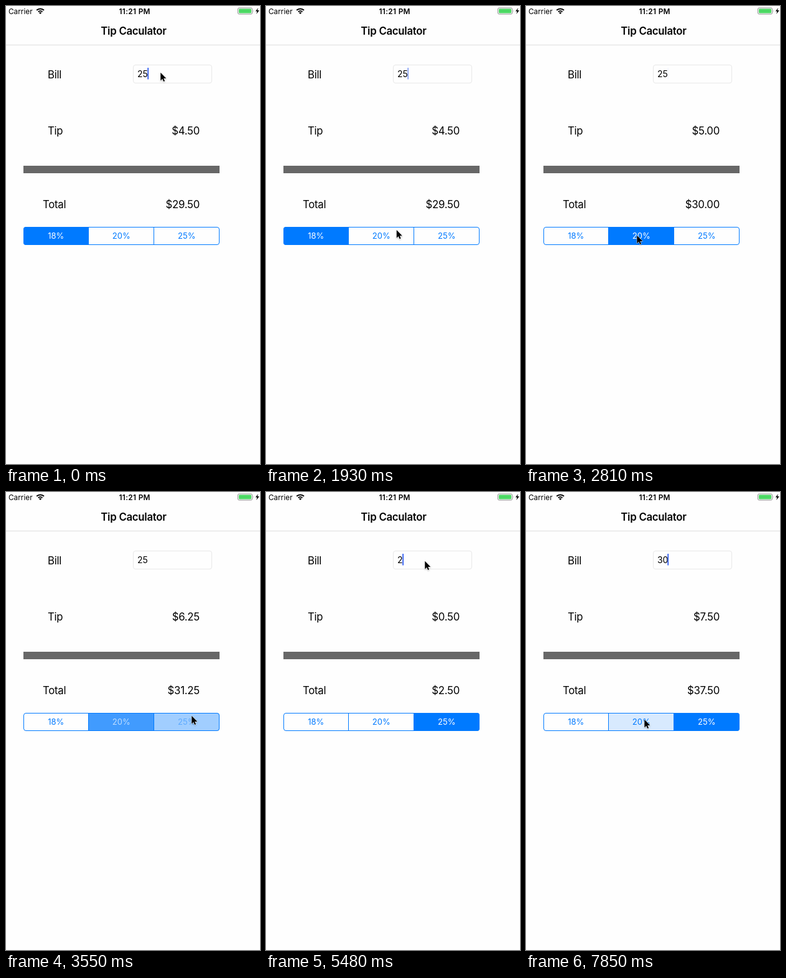
An HTML page for the animation above (8 s loop, 408x734 px).

```html
<!DOCTYPE html>
<html lang="en">
<head>
<meta charset="utf-8">
<title>Tip calculator</title>
<style>
html, body { margin: 0; width: 100%; height: 100%; overflow: hidden; background: #fefefe; }
svg { display: block; width: 100%; height: 100%; }
text { font: 16.76px Inter, Roboto, sans-serif; letter-spacing: -.25px; white-space: pre; }
.bold { font-weight: 600; }
.status { font-size: 11.8px; letter-spacing: 0; }
.time { letter-spacing: .35px; }
.field { font-size: 14px; letter-spacing: -.15px; }
.seg { font-size: 13px; letter-spacing: 0; }
.mid { text-anchor: middle; }
.end { text-anchor: end; }
</style>
</head>
<body>
<svg viewBox="0 0 408 734">
  <defs>
    <clipPath id="round"><rect x="28" y="354" width="315" height="29" rx="4"/></clipPath>
    <filter id="soft" x="-50%" y="-50%" width="200%" height="200%">
      <feDropShadow dx="0" dy="1" stdDeviation="1" flood-opacity=".3"/>
    </filter>
  </defs>

  <text class="status" x="4" y="12.5">Carrier</text>
  <path d="M49.2 6.8a8.4 8.4 0 0 1 11.8 0M51.7 9.4a4.9 4.9 0 0 1 6.8 0" fill="none" stroke="#000" stroke-width="2"/>
  <path d="M55.1 13l-2.1-2.1a3 3 0 0 1 4.2 0z"/>
  <text class="status bold time mid" x="206.7" y="12.5">11:21 PM</text>
  <rect x="372.5" y="3" width="23" height="10" rx="2" fill="none" stroke="#8e8e8e"/>
  <rect x="374" y="4.5" width="20" height="7" rx="1" fill="#4cd964"/>
  <path d="M397 6.3q1.4 1.7 0 3.4z" fill="#8e8e8e"/>
  <path d="M405 3l-4.2 5.6h2.6l-1.2 4.4 4.6-6h-2.9z"/>

  <text class="bold mid" x="205" y="46">Tip Caculator</text>
  <path d="M0 62.5h408" stroke="#dedede"/>

  <text x="67" y="115.5">Bill</text>
  <text x="67" y="206">Tip</text>
  <text x="59" y="324">Total</text>
  <rect x="204.5" y="94.5" width="126" height="29" rx="3.5" fill="none" stroke="#e8e8e8"/>
  <text id="bill" class="field" x="211" y="113.5"></text>
  <rect id="caret" y="99" width="2" height="18.5" fill="#426bf2"/>
  <text id="tip" class="end" x="311" y="206"></text>
  <rect x="28" y="256" width="315" height="12" fill="#676767"/>
  <text id="total" class="end" x="311" y="324"></text>

  <g id="segs" clip-path="url(#round)"></g>
  <g fill="none" stroke="#007aff">
    <rect x="28.5" y="354.5" width="314" height="28" rx="3.5"/>
    <path d="M132.5 354v29M237.5 354v29"/>
  </g>

  <path id="cursor" d="M.3 .8v12.6l2.9-2.7 1.9 4.4 2-.8-1.9-4.3h4.1z"
        stroke="#fff" paint-order="stroke" filter="url(#soft)"/>
</svg>
<script>
const $ = id => document.getElementById(id);
const LOOP = 8000, TICK = 147.8;   // the screen refreshes once per tick

// All times below are in ticks.
const moves = [
  { from: 9, to: 11, x: 304, y: 332 },
  { from: 12, to: 14, x: 178, y: 367 },
  { from: 19, to: 22, x: 298, y: 358 },
  { from: 26, to: 31, x: 249, y: 102 },
  { from: 32, to: 34, x: 255, y: 110 },
  { from: 47, to: 48, x: 260, y: 169 },
  { from: 48, to: 51, x: 190, y: 364 }
];
const edits = [
  { at: 0, text: '25' }, { at: 37, text: '2' }, { at: 39, text: '' },
  { at: 41, text: '3' }, { at: 45, text: '30' }
];
const taps = [{ at: 16, seg: 1 }, { at: 23, seg: 2 }, { at: 53, seg: 1 }];
const rates = [.18, .2, .25];
const FADE = 3, PRESSED = .15;

const clamp = v => Math.min(1, Math.max(0, v));
const smooth = v => (v = clamp(v), v * v * (3 - 2 * v));
const easeOut = v => 1 - (1 - clamp(v)) ** 2;
const money = n => '$' + n.toFixed(2);

const left = i => 28 + 105 * i;
$('segs').innerHTML = rates.map((r, i) =>
  `<rect x="${left(i)}" y="354" width="105" height="29" fill="#007aff"/>
   <text class="seg mid" x="${left(i) + 52.3}" y="373">${r * 100}%</text>`).join('');
const fills = [...$('segs').querySelectorAll('rect')];
const names = [...$('segs').querySelectorAll('text')];

function cursorAt(n) {
  let x = 248, y = 106;
  for (const m of moves) {
    const k = easeOut((n - m.from) / (m.to - m.from));
    x += (m.x - x) * k;
    y += (m.y - y) * k;
  }
  return [x, y];
}

// Solid for a moment after each edit, then blinking with short fades.
function caretAt(since) {
  const hold = 440, period = 990;
  if (since < hold) return 1;
  const p = (since - hold) % period;
  return clamp((Math.abs(p - 240) - 140) / 200);
}

// A tap tints its segment, then cross-fades the selection to it.
function segments(n) {
  const fill = [1, 0, 0];
  let selected = 0;
  for (const { at, seg } of taps.filter(p => p.at <= n)) {
    const u = smooth((n - at) / FADE);
    fill[selected] = 1 - u;
    fill[seg] = PRESSED + (1 - PRESSED) * u;
    if (n > at) selected = seg;
  }
  return { fill, selected };
}

function draw(t) {
  const n = Math.floor(t / TICK);
  const edit = edits.findLast(e => e.at <= n);
  const { fill, selected } = segments(n);
  const tip = edit.text * rates[selected];

  $('bill').textContent = edit.text;
  $('tip').textContent = money(tip);
  $('total').textContent = money(+edit.text + tip);
  $('caret').setAttribute('x', 211 + 8.1 * edit.text.length);
  $('caret').setAttribute('opacity', caretAt((n - edit.at) * TICK));
  fill.forEach((a, i) => {
    const white = a > PRESSED ? a : 0;
    fills[i].setAttribute('opacity', a);
    names[i].setAttribute('fill', `rgb(${255 * white},${122 + 133 * white},255)`);
  });
  $('cursor').setAttribute('transform', `translate(${cursorAt(n)})`);
}

const start = performance.now();
function frame() {
  draw((performance.now() - start) % LOOP);
  requestAnimationFrame(frame);
}
frame();
</script>
</body>
</html>
```
